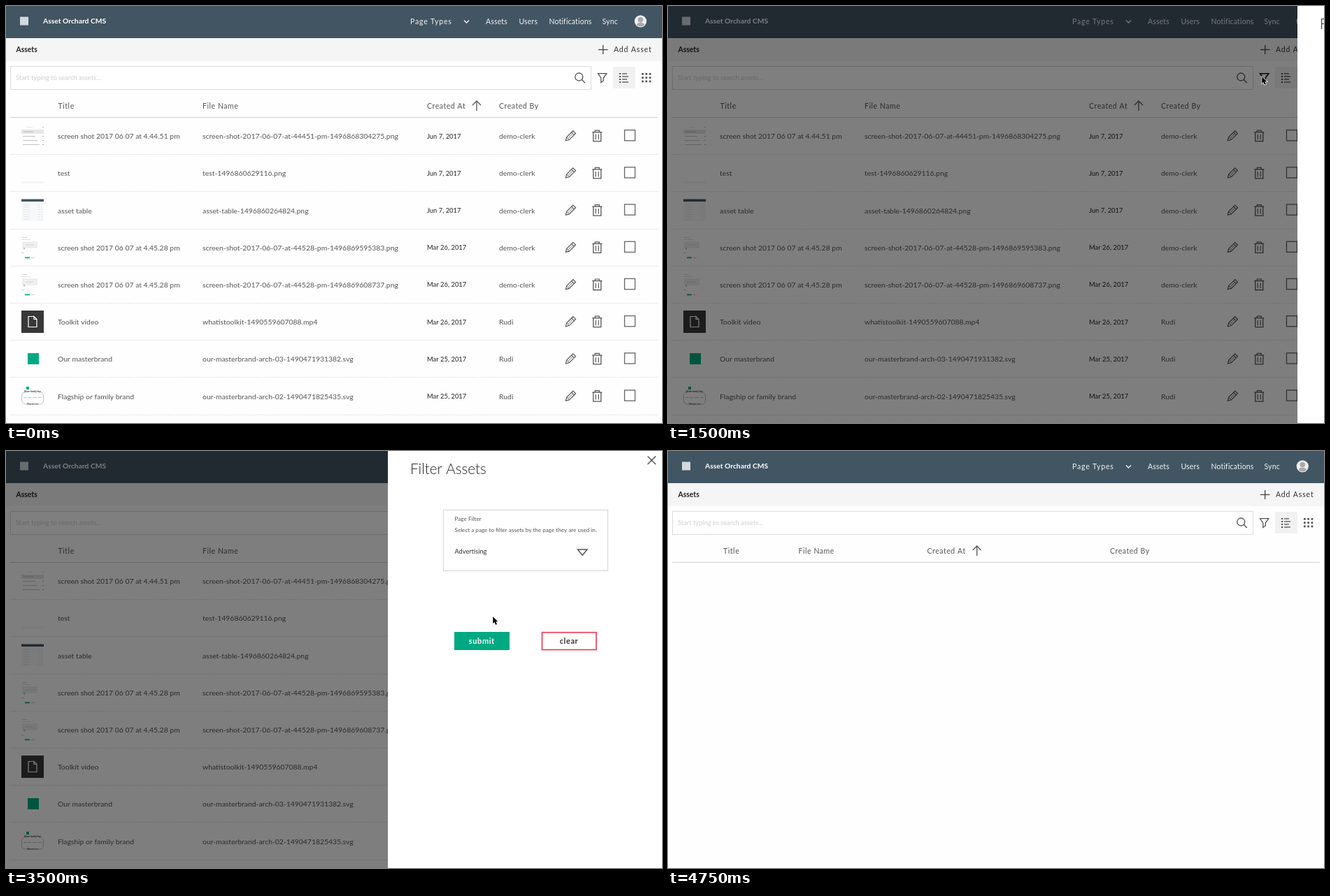
Write an HTML page with a canvas that moves like this. It is 938 px wide and 597 px high and loops after 5.25 s.

```html
<!DOCTYPE html>
<html lang="en">
<head>
<meta charset="utf-8">
<title>Asset filter</title>
<style>
html, body { margin: 0; width: 100%; height: 100%; overflow: hidden; background: #fff; }
canvas { display: block; width: 938px; height: 597px; }
</style>
</head>
<body>
<canvas id="stage"></canvas>
<script>
const W = 938, H = 597, LOOP = 5250, STEP = 250;
const canvas = document.getElementById('stage');
const ratio = window.devicePixelRatio || 1;
canvas.width = W * ratio;
canvas.height = H * ratio;
const ctx = canvas.getContext('2d');

const INK = '#555', SLATE = '#425563', GREEN = '#01a982';

const shot = 'screen shot 2017 06 07 at ';
const assets = [
  [shot + '4.44.51 pm', 'screen-shot-2017-06-07-at-44451-pm-1496868304275.png', 'Jun 7, 2017', 'demo-clerk', listThumb],
  ['test', 'test-1496860629116.png', 'Jun 7, 2017', 'demo-clerk', blankThumb],
  ['asset table', 'asset-table-1496860264824.png', 'Jun 7, 2017', 'demo-clerk', tableThumb],
  [shot + '4.45.28 pm', 'screen-shot-2017-06-07-at-44528-pm-1496869595383.png', 'Mar 26, 2017', 'demo-clerk', dialogThumb],
  [shot + '4.45.28 pm', 'screen-shot-2017-06-07-at-44528-pm-1496869608737.png', 'Mar 26, 2017', 'demo-clerk', dialogThumb],
  ['Toolkit video', 'whatistoolkit-1490559607088.mp4', 'Mar 26, 2017', 'Rudi', fileThumb],
  ['Our masterbrand', 'our-masterbrand-arch-03-1490471931382.svg', 'Mar 25, 2017', 'Rudi', badgeThumb],
  ['Flagship or family brand', 'our-masterbrand-arch-02-1490471825435.svg', 'Mar 25, 2017', 'Rudi', diagramThumb]
];

const pages = ['None', 'Advertising', 'Belmo', 'Basic Word Template', 'Biography', 'Brand Architecture',
  'Brand FAQ and Office Hours', 'Brand Tracking', 'Co-Marketing', 'Collateral', 'Color Palette', 'Element',
  'Email Signature', 'Events', 'External Email', 'Fax Memo', 'Flyers'];

// Pointer stops: start time, x, y
const pointerPath = [[250, 880, 69], [500, 874, 79], [750, 875, 67], [1000, 849, 101], [1750, 832, 105],
  [2000, 777, 145], [2250, 775, 149], [2750, 734, 194], [3000, 695, 235], [3250, 696, 237],
  [3750, 691, 268], [4000, 686, 273], [4500, 790, 67]];

function rect(x, y, w, h, color) {
  ctx.fillStyle = color;
  ctx.fillRect(x, y, w, h);
}

function frame(x, y, w, h, color, width = 1) {
  ctx.strokeStyle = color;
  ctx.lineWidth = width;
  ctx.strokeRect(x, y, w, h);
}

function disc(x, y, r, color) {
  ctx.fillStyle = color;
  ctx.beginPath();
  ctx.arc(x, y, r, 0, Math.PI * 2);
  ctx.fill();
}

function path(points, color, width = 1.2, closed = false) {
  ctx.beginPath();
  points.forEach(([x, y]) => ctx.lineTo(x, y));
  if (closed) ctx.closePath();
  ctx.strokeStyle = color;
  ctx.lineWidth = width;
  ctx.stroke();
}

// y is the visual middle of the line
function text(str, x, y, { size = 10.5, color = INK, weight = 400, gap = 0, align = 'left' } = {}) {
  ctx.font = `${weight} ${size}px Lato, "Open Sans", sans-serif`;
  ctx.letterSpacing = gap + 'px';
  ctx.textAlign = align;
  ctx.fillStyle = color;
  ctx.fillText(str, x, y + size * 0.36);
}

function magnifier(x, y, r) {
  ctx.beginPath();
  ctx.arc(x, y, r, 0, Math.PI * 2);
  ctx.strokeStyle = '#555';
  ctx.lineWidth = 1.3;
  ctx.stroke();
  path([[x + r * 0.7, y + r * 0.7], [x + r + 3, y + r + 3]], '#555', 1.4);
}

function listThumb(x, y) {
  rect(x + 8, y + 3, 8, 1, '#e4e4e4');
  rect(x, y + 7, 32, 6, '#e6e6e6');
  rect(x + 3, y + 9.5, 14, 1, '#bbb');
  for (let i = 0; i < 3; i++) {
    rect(x + 2, y + 16 + i * 6, 18 + i * 3, 1, '#c4c4c4');
    rect(x + 30, y + 16 + i * 6, 2, 1, '#aaa');
  }
  rect(x + 30, y + 3, 2, 1, '#bbb');
}

function blankThumb(x, y) {
  rect(x, y + 28, 32, 3, '#f5f5f5');
}

function tableThumb(x, y) {
  rect(x, y, 32, 31, '#f7f8f9');
  rect(x, y - 0.5, 32, 3.5, SLATE);
  for (let i = 0; i < 7; i++) {
    rect(x + 3, y + 7 + i * 3.5, 9, 0.7, '#dcdfe2');
    rect(x + 24, y + 7 + i * 3.5, 2, 0.7, '#d4d8db');
    rect(x + 28, y + 7 + i * 3.5, 2, 0.7, '#d4d8db');
  }
}

function dialogThumb(x, y) {
  rect(x + 1, y + 1, 7, 1, '#d8d8d8');
  rect(x + 1, y + 4, 12, 1, '#e0e0e0');
  rect(x + 2, y + 8, 20, 8, '#f0f0f0');
  frame(x + 2, y + 8, 20, 8, '#ddd', 0.7);
  rect(x + 6, y + 11.5, 12, 1, '#d4d4d4');
  rect(x + 3, y + 16, 2, 2.5, '#bbb');
  rect(x, y + 23, 4, 1, '#aadfd0');
  rect(x + 5, y + 29.3, 7, 2, '#19b48f');
  rect(x + 14, y + 29.8, 5, 1, '#ccc');
}

function fileThumb(x, y) {
  rect(x, y, 32, 32, '#383838');
  path([[x + 18, y + 8.5], [x + 10, y + 8.5], [x + 10, y + 23.5], [x + 22, y + 23.5], [x + 22, y + 12.5],
    [x + 18, y + 8.5], [x + 18, y + 12.5], [x + 22, y + 12.5]], '#fff', 1.2);
}

function badgeThumb(x, y) {
  rect(x + 9, y + 8, 16, 16, GREEN);
}

function diagramThumb(x, y) {
  rect(x + 7, y + 2, 4, 4, GREEN);
  ctx.beginPath();
  ctx.roundRect(x + 0.5, y + 10, 31, 17, 5);
  ctx.strokeStyle = '#aaa';
  ctx.lineWidth = 0.7;
  ctx.stroke();
  rect(x + 7, y + 7, 18, 5, '#fff');
  const tiny = { size: 3.4, color: '#333', weight: 700, align: 'center' };
  text('Main family line', x + 16, y + 8.5, tiny);
  text('one · two · three · four', x + 16, y + 17, { ...tiny, size: 2.6, color: '#777' });
  rect(x + 9, y + 25, 14, 4, '#fff');
  text('Shared set', x + 16, y + 27, tiny);
}

function pencil(x, y) {
  ctx.save();
  ctx.translate(x, y);
  ctx.rotate(Math.PI / 4);
  path([[-2.6, -8], [2.6, -8], [2.6, 5], [0, 9.3], [-2.6, 5]], '#555', 1.2, true);
  path([[-2.6, -5], [2.6, -5]], '#555', 1);
  path([[0, -5], [0, 5]], '#555', 0.8);
  path([[-2.6, 5], [2.6, 5]], '#555', 0.8);
  ctx.restore();
}

function trash(x, y) {
  path([[x - 7, y - 5.5], [x + 7, y - 5.5]], '#555', 1.3);
  path([[x - 3, y - 5.5], [x - 3, y - 8], [x + 3, y - 8], [x + 3, y - 5.5]], '#555');
  path([[x - 5.5, y - 5.5], [x - 5.5, y + 7.5], [x + 5.5, y + 7.5], [x + 5.5, y - 5.5]], '#555', 1.3);
  for (const dx of [-2, 2]) path([[x + dx, y - 2.5], [x + dx, y + 5]], '#555');
}

function drawBars(addHover, filterHover) {
  rect(0, 0, W, 46, SLATE);
  rect(20, 15.5, 12, 12, '#d3d9dd');
  text('Asset Orchard CMS', 53, 21.5, { size: 10.3, color: '#fff', weight: 700 });
  const nav = { color: '#f1f3f4', gap: 0.15 };
  text('Page Types', 578, 22, { ...nav, gap: 0.8 });
  path([[655, 20.5], [658.5, 24], [662, 20.5]], '#f1f3f4', 1.4);
  [['Assets', 686], ['Users', 733.5], ['Notifications', 776.5], ['Sync', 852.5]]
    .forEach(([label, x]) => text(label, x, 22, nav));

  disc(907.3, 21.8, 8.6, '#f0f0f0');
  ctx.save();
  ctx.beginPath();
  ctx.arc(907.3, 21.8, 7.6, 0, Math.PI * 2);
  ctx.clip();
  disc(907.3, 19.5, 3.8, '#a9a9a9');
  disc(907.3, 30, 6.6, '#a9a9a9');
  ctx.restore();

  rect(0, 46, W, 33, '#f5f5f5');
  text('Assets', 14.5, 62.5, { size: 10.4, color: '#222', weight: 700 });
  const plusWidth = addHover ? 2 : 1.3;
  path([[847, 62.5], [860.5, 62.5]], '#444', plusWidth);
  path([[853.7, 56], [853.7, 69]], '#444', plusWidth);
  text('Add Asset', 869, 62.5, { color: '#333', gap: 0.85 });

  rect(6.5, 86.5, 830, 33, '#fff');
  frame(6.5, 86.5, 830, 33, '#dcdcdc');
  text('Start typing to search assets...', 14, 103, { size: 9.35, color: '#cfcfcf' });
  magnifier(819.3, 101.5, 5.5);

  path([[846.5, 96.7], [858.8, 96.7], [854.3, 103], [854.3, 107], [850.8, 109.5], [850.8, 103]],
    filterHover ? '#111' : '#555', filterHover ? 1.6 : 1.3, true);

  rect(868, 87, 32, 31, '#f1f1f1');
  for (let i = 0; i < 4; i++) {
    const y = 96 + i * 4;
    rect(877, y, 2.2, 2, '#555');
    rect(881, y + 0.3, i % 2 ? 9 : 7, 1.3, '#555');
  }
  for (let i = 0; i < 9; i++) rect(909 + i % 3 * 5.3, 96 + Math.floor(i / 3) * 5.3, 2.7, 2.7, '#555');
}

function drawHeadings(title, file, created, arrow, author) {
  [['Title', title], ['File Name', file], ['Created At', created], ['Created By', author]]
    .forEach(([label, x]) => text(label, x, 143.5, { gap: 0.55 }));
  path([[arrow, 150], [arrow, 136]], '#555', 1.3);
  path([[arrow - 6, 142], [arrow, 136], [arrow + 6, 142]], '#555', 1.3);
  rect(6, 159, 926, 1, '#cfd3d3');
}

function drawRows() {
  assets.forEach(([title, file, date, author, thumb], i) => {
    const y = 186.2 + i * 53.2;
    thumb(22, Math.round(y - 16));
    text(title, 74, y + 0.3, { size: 10.4 });
    text(file, 281, y + 0.3, { size: 10.4 });
    text(date, 602, y, { size: 9.4, color: '#333', weight: 500 });
    text(author, 705, y + 0.3, { size: 10.4 });
    pencil(807, y);
    trash(845.3, y);
    frame(884.5, y - 8.6, 15, 15.2, '#666', 1.3);
    ctx.setLineDash([2, 1]);
    path([[6, Math.round(y + 26) + 0.5], [932, Math.round(y + 26) + 0.5]], '#e2e2e2', 1);
    ctx.setLineDash([]);
  });
}

function drawPanel(left, t) {
  const chosen = t >= 3500;
  ctx.save();
  ctx.translate(left - 546, 0);
  rect(546, 0, 392, H, '#fff');
  text('Filter Assets', 578, 26, { size: 20.6, color: '#222', weight: 300 });
  path([[917.5, 7.5], [929, 19]], '#444', 1.3);
  path([[929, 7.5], [917.5, 19]], '#444', 1.3);

  frame(625.5, 84.5, 235, 87, '#d5d5d5');
  text('Page Filter', 641.5, 97, { size: 8.2 });
  text('Select a page to filter assets by the page they are used in.', 641.5, 112.7, { size: 8.15 });
  text(chosen ? 'Advertising' : 'Select a page filter', 641.5, 144,
    { size: chosen ? 9.2 : 9.4, color: chosen ? '#333' : '#cfcfcf' });
  path([[817.5, 141], [831, 141], [824.2, 149.3]], '#555', 1.5, true);

  const grow = t >= 4000 ? 1.4 : t >= 3750 ? 0.8 : 0;
  rect(641 - grow, 259 - grow, 79 + grow * 2, 26 + grow * 2, GREEN);
  const label = { size: 11, weight: 700, gap: 0.6, align: 'center' };
  text('submit', 680.3, 272, { ...label, color: '#fff' });
  frame(766.5, 259.7, 77.5, 24.8, '#ee3550', 1.6);
  text('clear', 805, 272, { ...label, color: '#333' });

  if (t >= 2500 && t < 3500) drawDropdown(t < 3000);
  ctx.restore();
}

function drawDropdown(caret) {
  rect(625, 205, 236, H - 205, 'rgba(247,247,247,.91)');
  rect(626, 205, 234, 23.5, '#e8e8e8');
  path([[625.5, 205], [625.5, H]], '#e6e6e6', 1);
  path([[860.5, 205], [860.5, H]], '#e6e6e6', 1);
  rect(625, 172, 236, 33, '#fff');
  frame(626, 173, 234, 31.5, '#2ad2c9', 2);
  text('Search', 641, 188.5, { size: 9.4, color: '#c8c8c8' });
  if (caret) rect(641, 183, 1, 12, '#333');
  magnifier(835, 186.8, 5.2);
  pages.forEach((name, i) => text(name, 641, 216.4 + i * 23.65, { size: 9, color: i ? INK : '#333' }));
}

function drawPointer(t) {
  const stop = pointerPath.filter(([start]) => start <= t).pop();
  if (!stop || t >= 4750) return;
  ctx.save();
  ctx.translate(stop[1], stop[2]);
  ctx.beginPath();
  [[0.3, 0.3], [0.3, 10], [2.5, 8], [4.1, 11.8], [6, 11], [4.4, 7.3], [7.4, 7.2]]
    .forEach(([x, y]) => ctx.lineTo(x, y));
  ctx.closePath();
  ctx.strokeStyle = '#fff';
  ctx.lineWidth = 1.4;
  ctx.stroke();
  ctx.fillStyle = '#000';
  ctx.fill();
  ctx.restore();
}

function draw(t) {
  const filtered = t >= 4500;
  const open = t >= 1500 && !filtered;
  ctx.setTransform(ratio, 0, 0, ratio, 0, 0);
  rect(0, 0, W, H, '#fefefe');
  drawBars(t >= 750 && t < 1250, t >= 1000 && t < 1750);
  if (filtered) {
    drawHeadings(79, 186.5, 370.5, 441.7, 632);
  } else {
    drawHeadings(74.5, 281, 602, 673, 705);
    drawRows();
  }
  if (open) {
    rect(0, 0, W, H, 'rgba(0,0,0,.5)');
    drawPanel(t >= 1750 ? 546 : 900, t);
  }
  drawPointer(t);
}

function tick() {
  const t = performance.now() % LOOP;
  draw(Math.floor(t / STEP) * STEP);
  requestAnimationFrame(tick);
}
tick();
</script>
</body>
</html>
```
